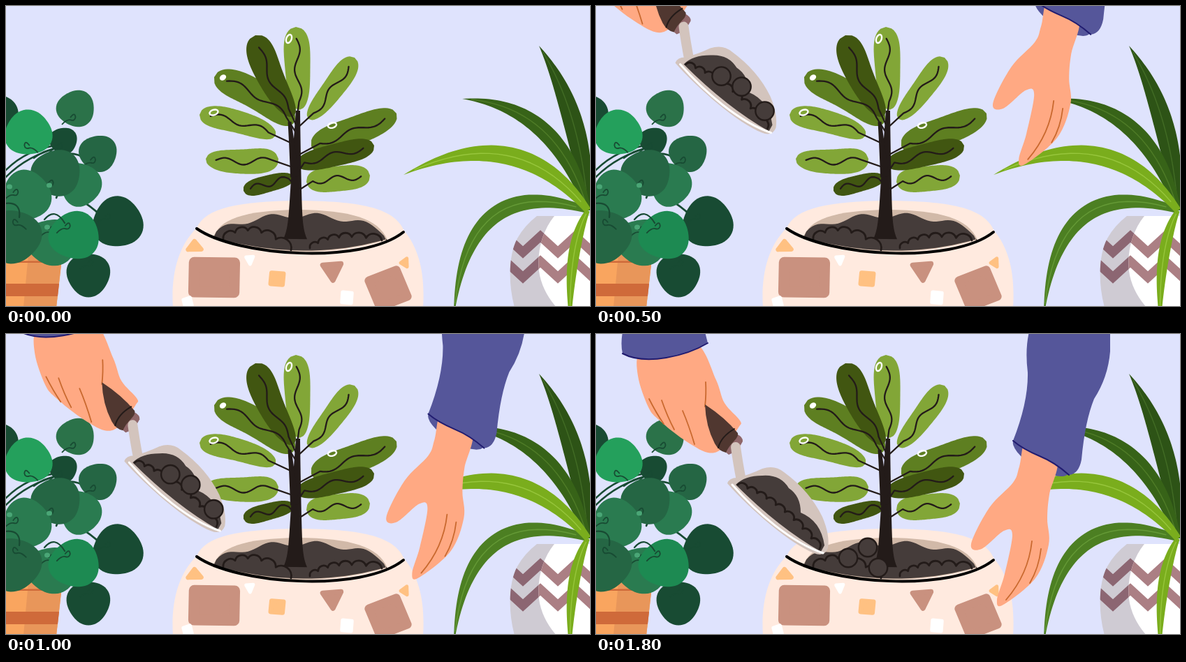
An HTML page with a canvas for the animation above (2.8 s loop, 836 by 430 pixels).

```html
<!DOCTYPE html>
<html lang="en">
<head>
<meta charset="utf-8">
<title>Potting a plant</title>
<style>
html, body { margin: 0; width: 100%; height: 100%; overflow: hidden; background: #dfe3fd; }
canvas { display: block; }
</style>
</head>
<body>
<canvas id="stage" width="836" height="430"></canvas>
<script>
const ctx = document.getElementById('stage').getContext('2d');
const INK = '#231b19', SOIL = '#453c3a', SKIN = '#ffa983', CREASE = '#c9692f';
const SLEEVE = '#55569a', HEM = '#211c70', METAL = '#d3c4bd';
const LIGHT = '#82a637', MID = '#5e7f21', DARK = '#415611';
const PINE = '#184b33', FERN = '#256644', MOSS = '#2a7b50';
const LOOP = 2800, STEP = 100, TAU = Math.PI * 2;

const range = (n, f) => Array.from({ length: n + 1 }, (_, i) => f(i / n));
const asPath = p => typeof p === 'string' ? new Path2D(p) : p;

function fill(color, path) {
  ctx.fillStyle = color;
  ctx.fill(asPath(path));
}

function stroke(color, width, path) {
  ctx.strokeStyle = color;
  ctx.lineWidth = width;
  ctx.stroke(asPath(path));
}

const poly = pts => new Path2D('M' + pts.map(p => p.join(' ')).join('L'));

// Closed smooth curve through a few key points.
function blob(color, pts) {
  const n = pts.length, at = i => pts[(i + n) % n], path = new Path2D();
  path.moveTo(...pts[0]);
  pts.forEach((b, i) => {
    const a = at(i - 1), c = at(i + 1), d = at(i + 2);
    path.bezierCurveTo(b[0] + (c[0] - a[0]) / 6, b[1] + (c[1] - a[1]) / 6,
      c[0] - (d[0] - b[0]) / 6, c[1] - (d[1] - b[1]) / 6, ...c);
  });
  fill(color, path);
}

function ellipse(x, y, rx, ry, turn = 0) {
  const p = new Path2D();
  p.ellipse(x, y, rx, ry, turn, 0, TAU);
  return p;
}

// Quadratic spine: point at t, moved sideways by off.
function spine([x0, y0], [cx, cy], [x1, y1]) {
  return (t, off = 0) => {
    const s = 1 - t;
    const dx = s * (cx - x0) + t * (x1 - cx), dy = s * (cy - y0) + t * (y1 - cy);
    const k = off / Math.hypot(dx, dy);
    return [s * s * x0 + 2 * s * t * cx + t * t * x1 - dy * k,
      s * s * y0 + 2 * s * t * cy + t * t * y1 + dx * k];
  };
}

// Shape around a spine with half width w(t).
function limb(color, at, w) {
  const side = sign => range(48, t => at(t, sign * w(t)));
  fill(color, poly([...side(1), ...side(-1).reverse()]));
}

// Row of round bumps along a spine.
function bumps(at, count) {
  const pts = range(count, t => at(t));
  let d = 'M' + pts[0].join(' ');
  for (let i = 1; i <= count; i++) {
    const r = 0.54 * Math.hypot(pts[i][0] - pts[i - 1][0], pts[i][1] - pts[i - 1][1]);
    d += `A${r} ${r} 0 0 1 ${pts[i].join(' ')}`;
  }
  stroke(INK, 2.8, d);
}

// Round leaf with a notch at the stem, a point opposite, and a curled stalk.
function roundLeaf(color, x, y, rx, ry, stem) {
  fill(color, poly(range(60, t => {
    const a = t * TAU, r = 1 - 0.05 * Math.cos(3 * (a - stem));
    return [x + rx * r * Math.cos(a), y + ry * r * Math.sin(a)];
  })));
  const sx = x + rx * 0.55 * Math.cos(stem), sy = y + ry * 0.55 * Math.sin(stem);
  const side = Math.cos(stem) > 0 ? -1 : 1;
  stroke(PINE, 1.8, `M${sx} ${sy}q${6 * side} -8 ${7 * side} 0q${-side} 6 ${-7 * side} 4q${-5 * side} -1 ${-12 * side} 6`);
}

function leftPlant() {
  fill('#f9a55f', 'M-2 345H82L72 432H-2Z');
  fill('#e8965a', 'M33 345H82L72 432H25Z');
  fill('#cf6a3a', 'M0 398H76L74 416H0ZM0 365.500H80V368H0Z');
  for (const y of [237, 247]) stroke(PINE, 2.6, `M-2 ${y}Q30 ${y - 33} 78 ${y / 3 + 120}`);
  stroke(PINE, 2.6, 'M103 276Q122 287 135 300M88 212Q100 210 115 219M72 275Q76 262 90 254');
  for (const leaf of [
    [PINE, -2, 157, 19, 28, 3],
    ['#2b7249', 100, 147, 27, 26, 2.1],
    [PINE, 82, 193, 20, 19, 2.4],
    ['#24a05c', 32, 182, 34, 32, 1.5],
    [FERN, 132, 211, 27, 26, 2.4],
    [MOSS, 107, 256, 29, 31, 3],
    [FERN, 72, 239, 35, 33, 2.2],
    [MOSS, 29, 272, 35, 36, 3.4],
    [PINE, 160, 310, 36, 36, -2.7],
    [PINE, 118, 385, 31, 31, -1.6],
    [MOSS, 66, 338, 38, 33, -1.8],
    [FERN, 11, 330, 39, 38, -1.3],
    ['#1d8a52', 98, 329, 36, 34, -2.3],
  ]) roundLeaf(...leaf);
  stroke(PINE, 2.2, 'M55 306Q70 288 84 311M-2 283Q22 280 19 303M40 218Q55 206 72 204');
  for (const [x, y] of [[5, 259], [59, 317], [62, 257]]) fill('#4aa676', ellipse(x, y, 4, 3.5));
}

function blade(color, rib, at, width) {
  limb(color, at, t => width * Math.sin(Math.PI * (0.12 + 0.88 * t)));
  stroke(rib, 1.4, poly(range(20, t => at(0.05 + 0.9 * t))));
}

function rightPlant() {
  ctx.save();
  ctx.clip(new Path2D('M760 301H840V432H728C718 395 720 355 732 333Q742 315 760 301Z'));
  ctx.lineJoin = 'miter';
  const paint = (base, band) => {
    ctx.fillStyle = base;
    ctx.fillRect(700, 290, 140, 145);
    for (const y of [330, 366])
      stroke(band, 13, poly(range(6, t => [715 + 150 * t, y + (Math.round(t * 6) % 2 ? 23 : 0)])));
  };
  paint('#cfcbd3', '#8c6672');
  ctx.clip(new Path2D('M785 301C768 322 760 350 763 380Q767 408 788 432H840V301Z'));
  paint('#fff', '#ab7f84');
  ctx.restore();

  const root = [833, 293];
  blade('#2d5316', '#426c25', spine(root, [823, 150], [763, 57]), 14);
  blade('#376318', '#4f7c27', spine(root, [790, 140], [653, 133]), 12);
  blade('#4c7f22', '#659a36', spine(root, [657, 234], [641, 446]), 11.5);
  blade('#7aad1d', '#97c63c', spine(root, [732, 161], [569, 242]), 13);
  blade('#7aad1d', '#97c63c', spine(root, [804, 345], [808, 462]), 8);
}

// Rounded polygon stone.
function chip(color, x, y, rx, ry, sides, turn) {
  const p = poly(range(sides, t => [x + rx * Math.cos(turn + t * TAU), y + ry * Math.sin(turn + t * TAU)]));
  fill(color, p);
  stroke(color, 3 + 0.3 * rx, p);
}

function pot() {
  fill('#ffeadf', 'M239 432C236 385 246 345 273 318C286 289 333 280 418 279C505 280 555 288 570 322C592 349 600 385 597 432Z');
  fill('#d1b9a8', 'M296 334C304 305 342 293 418 292C494 293 532 304 546 335Q420 370 296 334Z');

  const mound = range(60, t => [297 + 248 * t,
    333 - 33 * Math.sqrt(Math.abs(Math.sin(Math.PI * t))) - 4 * Math.cos(23.3 * (t - 0.33))]);
  const floor = range(20, t => spine([545, 334], [430, 368], [297, 332])(t));
  fill(SOIL, poly([...mound, ...floor]));
  bumps(spine([311, 334], [352, 303], [408, 350]), 5);
  bumps(spine([435, 347], [467, 322], [538, 336]), 6);
  stroke('#000', 4, 'M273 319C330 359 510 371 569 324');

  const brown = '#c9917f', peach = '#ffc182', white = '#fff';
  for (const stone of [
    [brown, 298, 389, 41, 30, 4, 0.8],
    [brown, 467, 378, 15, 15, 3, 1.5],
    [brown, 547, 405, 30, 29, 4, 0.4],
    [peach, 270, 345, 11, 8, 3, 2.6],
    [peach, 388, 391, 12, 11, 4, -0.7],
    [peach, 571, 368, 6, 7, 3, 3.1],
    [white, 349, 363, 6, 7, 3, 1.5],
    [white, 488, 418, 9, 10, 4, -0.7],
    [white, 260, 425, 7, 8, 4, 0.5],
  ]) chip(...stone);
}

// Leaf from base to tip, bowed by bend, half width a at the base and b at the tip.
function treeLeaf(color, x0, y0, x1, y1, bend, a, b) {
  const len = Math.hypot(x1 - x0, y1 - y0);
  const ctrl = [(x0 + x1) / 2 - (y1 - y0) / len * 2 * bend, (y0 + y1) / 2 + (x1 - x0) / len * 2 * bend];
  const at = spine([x0, y0], ctrl, [x1, y1]);
  limb(color, at, t => (a + (b - a) * t) * Math.sqrt(1 - Math.pow(Math.abs(2 * t - 1), 3.6)));
  const vein = range(30, t => at(0.1 + 0.76 * t, 4.5 * Math.sin(t * 3 * Math.PI)));
  return poly([[416, y0 + 14], ...vein]);
}

function tree() {
  const veins = [
    [LIGHT, 420, 149, 415, 30, 0, 15, 21],
    [LIGHT, 386, 186, 277, 156, 5, 14, 18],
    [MID, 411, 169, 298, 102, 9, 19, 22],
    [DARK, 412, 158, 357, 42, -6, 14, 24],
    [LIGHT, 390, 219, 286, 219, -4, 20, 15],
    [DARK, 412, 246, 340, 265, 1, 11, 13],
    [LIGHT, 433, 162, 499, 74, 2, 13, 18],
    [MID, 437, 201, 559, 154, 2, 22, 19],
    [LIGHT, 430, 252, 521, 243, 0, 18, 18],
    [DARK, 416, 227, 527, 200, 0, 15, 17],
  ].map(leaf => treeLeaf(...leaf));
  for (const v of veins) stroke(INK, 2.3, v);

  limb(INK, spine([414, 334], [415, 240], [418, 150]), t => 3 + 8 * (1 - t) + 6 * (1 - t) ** 14);
  limb(INK, spine([413, 245], [410, 205], [406, 166]), t => 6 - 3.5 * t);

  fill('#fff', ellipse(310.500, 102.500, 5, 3.8, -0.6));
  for (const [x, y, turn] of [[297.5, 152.5, -0.3], [405, 47, -1.2], [467, 171, -0.25]])
    stroke('#fff', 2.4, ellipse(x, y, 6.2, 3.7, turn));
}

function trowelHand() {
  blob(SKIN, [[63, 25], [60, 60], [75, 105], [91, 124], [125, 151], [160, 170], [182, 163], [204, 134],
    [206, 124], [184, 99], [172, 66], [146, 15], [100, 10]]);
  fill(SLEEVE, 'M38 -3Q35 15 38 28C72 46 130 31 160 13L156 -3Z');
  stroke(HEM, 2, 'M38 28C72 46 130 31 160 13');
  stroke(CREASE, 1.8, 'M76 93Q86 113 97 129M94 95Q102 118 112 137M124 110Q133 131 141 158M157 69Q158 85 156 104');
  fill('#8f6669', 'M201 143Q211 148 210 154Q203 169 190 173L184 168Z');
  fill('#503730', 'M156 101Q185 120 203 142Q204 147 198 153Q190 161 186 170Q176 168 170 157Q157 132 156 101Z');
  stroke(INK, 2, 'M175 163Q179 147 198 136');
  stroke(METAL, 14, 'M200 162Q203 184 208 210');

  fill(METAL, 'M188 214Q191 206 202 206Q219 202 238 193Q256 187 269 198Q306 225 324 262Q335 288 332 307Q327 320 312 314C279 301 222 253 188 214Z');
  fill(SOIL, 'M200 216Q213 203 238 203Q264 201 276 221Q293 232 293 256Q322 268 327 303L322 312Q262 278 200 216Z');
  stroke('#fff', 3, 'M195 216C230 256 280 299 325 314');
  bumps(spine([203, 216], [266, 238], [320, 308]), 9);
}

function steadyHand() {
  fill(SLEEVE, ellipse(637, 176, 46, 17, 0.55));
  blob(SKIN, [[618, 150], [606, 190], [597, 213], [563, 249], [537, 301], [552, 308], [584, 282], [596, 288],
    [585, 344], [574, 381], [583, 388], [629, 350], [648, 302], [646, 265], [649, 230], [660, 178]]);
  fill(SLEEVE, 'M620 -3Q614 22 618 55Q619 97 597 153Q611 165 635 175Q657 184 677 202Q691 201 695 180Q700 125 713 93Q733 62 736 25V-3Z');
  stroke(HEM, 2, 'M597 153Q611 165 635 175Q657 184 677 202');
  stroke(CREASE, 1.8, 'M624 297Q619 344 587 381M637 308Q634 335 621 357');
}

// Resting place in the scoop, then in the pot.
const balls = [[254, 233, 361, 321], [283, 248, 389, 306], [316, 283, 404, 335]];

function ball(x, y) {
  const p = ellipse(x, y, 13.2, 13.2);
  fill(SOIL, p);
  stroke(INK, 2.4, p);
}

function shifted(x, y, draw) {
  ctx.save();
  ctx.translate(x, y);
  draw();
  ctx.restore();
}

function scene(step) {
  ctx.fillStyle = '#dfe3fd';
  ctx.fillRect(0, 0, 836, 430);
  ctx.lineCap = ctx.lineJoin = 'round';
  leftPlant();
  rightPlant();
  pot();
  tree();
  if (step === 0) return;

  // Steps left in the quick entry and the slow approach; share of the drop done.
  const quick = Math.max(0, 6 - step);
  const slow = Math.min(6, Math.max(0, 12 - step));
  const drop = Math.max(0, step - 12) / 6;
  shifted(3.7 * slow + 9 * quick, -19.2 * slow - 46 * quick, steadyHand);
  shifted(-9.35 * slow - 18.4 * quick, -15.9 * slow - 37 * quick, () => {
    trowelHand();
    for (const [ax, ay, bx, by] of balls) ball(ax + (bx - ax) * drop, ay + (by - ay) * drop);
  });
}

let shown = -1;
function tick() {
  const step = Math.min(18, Math.floor(performance.now() % LOOP / STEP));
  if (step !== shown) scene(shown = step);
  requestAnimationFrame(tick);
}
tick();
</script>
</body>
</html>
```
